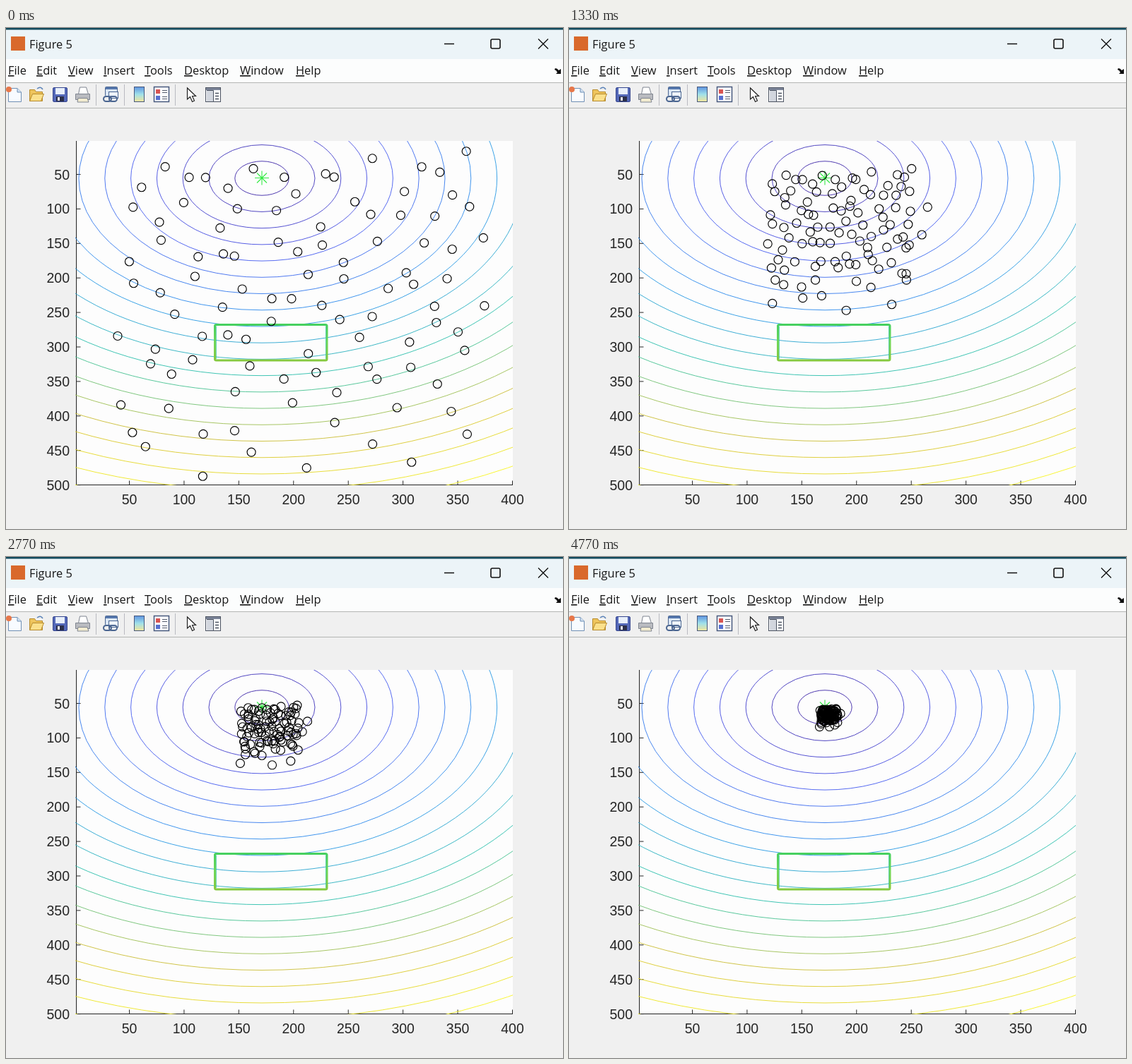
These frames come from a looping animation (788x710 px, 4810 ms). An HTML page:

```html
<!DOCTYPE html>
<html lang="en">
<head>
<meta charset="utf-8">
<title>Figure 5</title>
<style>
html, body { margin: 0; width: 100%; height: 100%; overflow: hidden; background: #f0f0f0; }
svg { display: block; width: 788px; height: 710px; }
.ui { font-family: "Open Sans", "Noto Sans", sans-serif; font-size: 16.4px; fill: #161616; }
.tick { font-family: "Liberation Sans", Arial, sans-serif; font-size: 19.5px; fill: #262626; }
</style>
</head>
<body>
<svg id="stage" viewBox="0 0 788 710">
  <defs>
    <clipPath id="plot"><rect x="98" y="160" width="619" height="488"/></clipPath>
    <linearGradient id="wall" x1="0" y1="420" x2="0" y2="471" gradientUnits="userSpaceOnUse">
      <stop offset="0" stop-color="#46d060"/><stop offset=".5" stop-color="#6fd758"/><stop offset="1" stop-color="#86c93f"/>
    </linearGradient>
    <linearGradient id="bar" x1="0" y1="0" x2="0" y2="1">
      <stop offset="0" stop-color="#5f94e0"/><stop offset=".5" stop-color="#9fe0ea"/><stop offset="1" stop-color="#f3e69a"/>
    </linearGradient>
  </defs>

  <!-- window chrome -->
  <rect width="788" height="710" fill="#f0f0f0"/>
  <rect width="788" height="44" fill="#ecf4f8"/>
  <rect width="788" height="2.5" fill="#124a5c"/>
  <rect y="44" width="788" height="33" fill="#fcfdfd"/>
  <path d="M0 77.5H788M0 113.5H788" stroke="#b4b5b4"/>
  <rect x="7" y="12" width="20" height="20" fill="#d9692c"/>
  <text class="ui" x="33" y="29">Figure 5</text>
  <g fill="none" stroke="#111" stroke-width="1.3">
    <path d="M620 22.5h14M753 15.5l14 14M767 15.5l-14 14"/>
    <rect x="686" y="16" width="13" height="13" rx="2" stroke-width="1.6"/>
  </g>
  <path d="M777 57q3 0 5 3l3-2v7h-7l2-2q-1-3-4-4z" fill="#111"/>
  <g id="menu"></g>

  <!-- toolbar -->
  <path d="M127.5 80v30M167.5 80v30M239.5 80v30" stroke="#b9bac0"/>
  <g id="new">
    <path d="M3.5 85.5H16l5.5 5.5v13.5h-18z" fill="#f8fbff" stroke="#6f8fb4"/>
    <path d="M16 85.5V91h5.5" fill="#d3e2f3" stroke="#6f8fb4"/>
    <circle cx="4" cy="87" r="4" fill="#e77749"/>
  </g>
  <g id="open" stroke="#b78b2d">
    <path d="M33.5 103.5v-16h7l2 3h9v13z" fill="#eec45c"/>
    <path d="M33.5 103.5l4-10h16l-4 10z" fill="#fbe08b"/>
    <path d="M44 86q5-4 8 1" fill="none" stroke="#5a82b8" stroke-width="1.5"/>
  </g>
  <g id="save">
    <rect x="66.5" y="84.5" width="20" height="20" rx="1.5" fill="#5468b8" stroke="#37478f"/>
    <rect x="70" y="85" width="13" height="9" fill="#e8effb"/>
    <rect x="71" y="97" width="11" height="7" fill="#2b2f4a"/>
    <rect x="73" y="98" width="3" height="5" fill="#eef"/>
  </g>
  <g id="print" stroke="#7f8590">
    <path d="M102.5 94l2-10h9l3 10z" fill="#fff"/>
    <path d="M98.5 93.5h20v8h-20z" fill="#b9bbc0"/>
    <path d="M102 99.5h13l2 5.5h-16z" fill="#f3ecd0"/>
  </g>
  <g id="link" stroke="#4b6691">
    <rect x="140.5" y="83.5" width="17" height="13" rx="1" fill="#dbe7f5"/>
    <path d="M141 85.5h16" stroke="#5577ad" stroke-width="3"/>
    <rect x="145.5" y="90.5" width="13" height="9" fill="#eef4fb"/>
    <rect x="138" y="97" width="11" height="7" rx="3.5" fill="none" stroke-width="2"/>
    <rect x="146" y="97" width="11" height="7" rx="3.5" fill="none" stroke-width="2"/>
  </g>
  <rect x="181.5" y="83.5" width="14" height="21" fill="url(#bar)" stroke="#47597d"/>
  <g id="legend">
    <rect x="209.5" y="83.5" width="21" height="21" fill="#fbfcff" stroke="#47597d" stroke-width="1.5"/>
    <rect x="212" y="87" width="6" height="6" fill="#d85452"/>
    <rect x="212" y="96" width="6" height="6" fill="#566fd0"/>
    <path d="M221 88.5h7M221 91.5h7M221 97.5h7M221 100.5h7" stroke="#555c6c"/>
  </g>
  <path d="M256.5 85v16l4-3.5 3 7 3-1.5-3-6.5h5z" fill="#fff" stroke="#222" stroke-width="1.2"/>
  <g id="inspect" stroke="#4d5462">
    <rect x="282.5" y="84.5" width="21" height="20" fill="#fafbfd"/>
    <path d="M283 86.5h20" stroke="#7b8498" stroke-width="3"/>
    <path d="M284 88.5h9.5v16H284" fill="#d2d6de"/>
    <path d="M296 92.5h5M296 96.5h5M296 100.5h5" stroke-width="1.5"/>
  </g>

  <!-- plot -->
  <rect x="98" y="160" width="619" height="487" fill="#fdfdfd"/>
  <path d="M99.5 160V647.5H717" fill="none" stroke="#262626" stroke-width="1.1"/>
  <g id="ticks" stroke="#262626"></g>
  <g id="labels" class="tick"></g>
  <g id="rings" clip-path="url(#plot)" fill="none" stroke-opacity=".9"></g>
  <rect x="295.5" y="420.5" width="158.5" height="50.5" rx="2" fill="none" stroke="url(#wall)" stroke-width="3"/>
  <path d="M297.5 469V422.5M452.5 469V422.5" stroke="#35c3a4" stroke-opacity=".7"/>
  <path d="M352 212.5h20M362 202.5v20M355 205.5l14 14M369 205.5l-14 14" stroke="#35ea45" stroke-width="1.1"/>
  <g id="swarm" fill="none" stroke="#000" stroke-width="1.15"></g>
</svg>

<script>
const NS = "http://www.w3.org/2000/svg";
const $ = id => document.getElementById(id);

function add(parent, tag, attrs, text) {
  const el = document.createElementNS(NS, tag);
  for (const key in attrs) el.setAttribute(key, attrs[key]);
  if (text !== undefined) el.textContent = text;
  parent.appendChild(el);
  return el;
}

const menus = { File: 3, Edit: 43, View: 88, Insert: 138, Tools: 196, Desktop: 252, Window: 331, Help: 410 };
for (const name in menus) {
  const item = add($("menu"), "text", { class: "ui", x: menus[name], y: 66 });
  add(item, "tspan", { "text-decoration": "underline" }, name[0]);
  add(item, "tspan", {}, name.slice(1));
}

// Axes
const px = v => 174.5 + (v - 50) * 1.5486;
const py = v => 207.5 + (v - 50) * 0.978;
for (let v = 50; v <= 500; v += 50) {
  const y = py(v);
  add($("ticks"), "path", { d: `M99.5 ${y}h6` });
  add($("labels"), "text", { x: 90, y: y + 7, "text-anchor": "end" }, v);
  if (v > 400) continue;
  const x = px(v);
  add($("ticks"), "path", { d: `M${x} 647.5v-6` });
  add($("labels"), "text", { x, y: 675, "text-anchor": "middle" }, v);
}

// Evenly spaced distance contours around the goal
const palette = [[62, 38, 168], [71, 88, 240], [40, 148, 236], [45, 196, 164], [212, 190, 48], [249, 246, 30]];

function shade(u) {
  const p = u * (palette.length - 1);
  const i = Math.min(Math.floor(p), palette.length - 2);
  return `rgb(${palette[i].map((c, n) => Math.round(c + (palette[i + 1][n] - c) * (p - i)))})`;
}

for (let k = 1; k <= 20; k++) {
  add($("rings"), "ellipse", {
    cx: 362, cy: 213, rx: 36.8 * k + 1.4, ry: 23.22 * k + 1, stroke: shade((k - 1) / 19)
  });
}

// Agents scattered evenly with jitter, a few trailing near the bottom
let seed = 7;
function random() {
  seed = (seed * 16807) % 2147483647;
  return seed / 2147483647;
}

const focus = { x: 365, y: 217 };
const agents = Array.from({ length: 100 }, (_, i) => {
  const u = (i * 0.7549 + 0.5) % 1, v = (i * 0.5698 + 0.5) % 1;
  const x = 158 + 522 * u + 30 * (random() - 0.5);
  const y = 180 + 390 * v + 70 * v ** 8 + 20 * (random() - 0.5);
  return {
    dx: x - focus.x,
    dy: y - focus.y,
    rate: 0.58 + 0.13 * random(),
    el: add($("swarm"), "circle", { r: 6 })
  };
});

// Every agent closes in exponentially at its own rate
function draw(sec) {
  for (const a of agents) {
    const s = Math.exp(-a.rate * sec);
    a.el.setAttribute("cx", (focus.x + a.dx * s).toFixed(2));
    a.el.setAttribute("cy", (focus.y + a.dy * s).toFixed(2));
  }
}

// The picture steps 30 times a second, on whole hundredths
const LOOP = 4810, STEPS = 144;
const stepTime = k => Math.round(k * 10 / 3) * 10;

function stepAt(ms) {
  let k = Math.min(STEPS - 1, Math.floor(ms * 0.03) + 1);
  while (stepTime(k) > ms) k--;
  return k;
}

const begin = performance.now();
function tick() {
  const ms = Math.max(0, performance.now() - begin) % LOOP;
  draw(stepAt(ms) / 30);
  requestAnimationFrame(tick);
}
draw(0);
requestAnimationFrame(tick);
</script>
</body>
</html>
```
